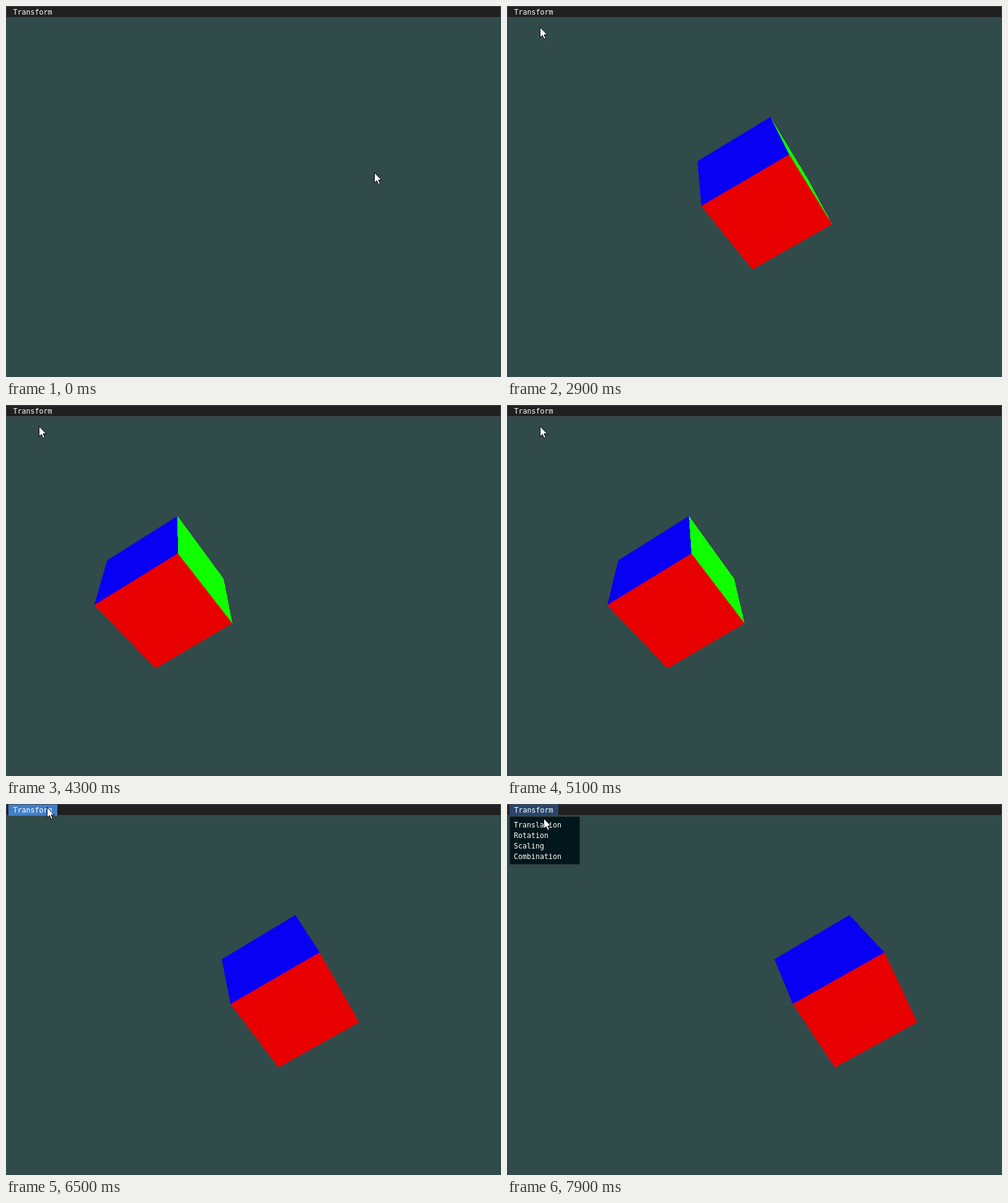
An HTML page for the animation above (8 s loop, 800 by 600 pixels).

```html
<!DOCTYPE html>
<html lang="en">
<head>
<meta charset="utf-8">
<title>Cube transform</title>
<style>
  html, body { margin: 0; width: 100%; height: 100%; overflow: hidden; background: #314a4a; }
  svg { display: block; width: 800px; height: 600px; }
  text { font: 11.63px "DejaVu Sans Mono", monospace; fill: #fff; }
  rect, polygon { shape-rendering: crispEdges; }
</style>
</head>
<body>
<svg viewBox="0 0 800 600">
  <rect width="800" height="600" fill="#314a4a"/>
  <g id="cube">
    <polygon id="green" fill="#10ff00"/>
    <polygon id="blue" fill="#0800f2"/>
    <polygon id="red" fill="#e80000"/>
  </g>
  <rect x=".5" y=".5" width="799" height="18" fill="#202020" stroke="#424850"/>
  <rect id="button" x="4" y="1" width="79" height="18"/>
  <text x="11.5" y="14">Transform</text>
  <g id="menu">
    <rect x="4.5" y="20.5" width="113" height="77" fill="#02171b" stroke="#2b2a2f"/>
    <rect id="item" x="8" y="26" width="106" height="17" fill="#407fca"/>
    <text x="11" y="38">Translation</text>
    <text x="11" y="55">Rotation</text>
    <text x="11" y="72">Scaling</text>
    <text x="11" y="89">Combination</text>
  </g>
  <path id="cursor" d="M0 0V16.5L3.8 13 6.4 19 9 18 6.5 12H11.5Z" fill="#fff" stroke="#000"/>
</svg>
<script>
const LOOP = 8000, STEP = 200, OFFSET = 100;
const el = id => document.getElementById(id);
const show = (id, on) => el(id).setAttribute('visibility', on ? 'visible' : 'hidden');

// Corner: resting x, y, and horizontal swing (nearer corners swing further)
const corners = {
  near: [443.2, 240, 170.6],
  left: [301.6, 323.5, 164],
  bottom: [385.4, 426, 147.9],
  right: [513.8, 353, 152.6],
  top: [414.8, 179.5, 141.9],
  backLeft: [297.3, 251, 137.8],
  backRight: [477.1, 281, 129.2]
};
const faces = {
  green: ['top', 'backRight', 'right', 'near'],
  blue: ['top', 'near', 'left', 'backLeft'],
  red: ['near', 'right', 'bottom', 'left']
};

// Cursor path: time, x, y
const path = [
  [300, 596, 269], [500, 575, 300], [700, 500, 353], [900, 360, 300],
  [1100, 210, 160], [1300, 100, 50], [1500, 50, 7], [1700, 50, 8],
  [2300, 54, 34], [5900, 54, 34], [6100, 75, 22], [6300, 84, 5],
  [6500, 67, 5], [7300, 67, 5], [7900, 60, 23]
];

function cursorAt(t) {
  const i = path.findIndex(p => p[0] >= t);
  if (i <= 0) return path[0].slice(1);
  const [t0, x0, y0] = path[i - 1], [t1, x1, y1] = path[i];
  const k = (t - t0) / (t1 - t0);
  return [x0 + (x1 - x0) * k, y0 + (y1 - y0) * k].map(Math.round);
}

function drawCube(t) {
  const swing = -Math.sin(t / 1000 - 2.976);
  for (const [face, names] of Object.entries(faces)) {
    const points = names.map(name => {
      const [x, y, reach] = corners[name];
      return (x + reach * swing).toFixed(2) + ',' + y;
    });
    el(face).setAttribute('points', points.join(' '));
  }
}

function draw(now) {
  const time = now % LOOP;
  const t = Math.max(0, Math.floor((time - OFFSET) / STEP) * STEP + OFFSET);
  const [x, y] = cursorAt(t);
  const open = (t >= 1700 && t < 2900) || t >= 7100;
  const hover = x >= 4 && x < 83 && y < 19;

  show('cube', t >= 2900);
  drawCube(t);
  show('menu', open);
  show('item', open && y >= 26);
  show('button', open || hover);
  el('button').setAttribute('fill', hover ? '#407fca' : '#29456a');
  el('cursor').setAttribute('transform', `translate(${x - .5} ${y + .5})`);
}

const start = performance.now();
function tick() {
  draw(performance.now() - start);
  requestAnimationFrame(tick);
}
tick();
</script>
</body>
</html>
```
